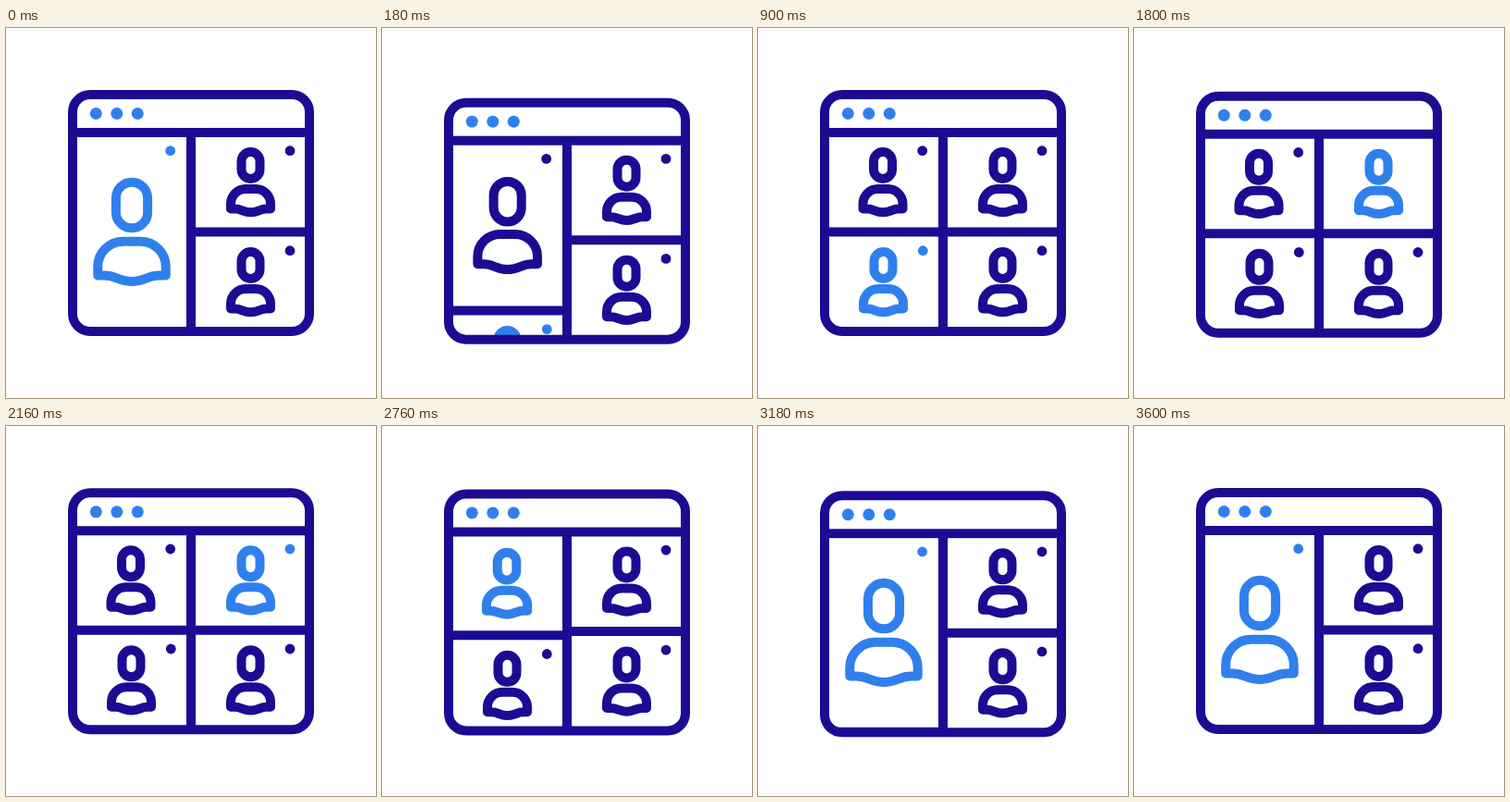
Animation of 400 by 400 pixels, one loop 4130 ms. Source, as an HTML page with a canvas:

```html
<!DOCTYPE html>
<html lang="en">
<head>
<meta charset="utf-8">
<title>Video call layout</title>
<style>
  html, body { margin: 0; width: 100%; height: 100%; overflow: hidden; background: #fff; }
  canvas { display: block; width: 400px; height: 400px; }
</style>
</head>
<body>
<canvas id="stage" width="400" height="400"></canvas>
<script>
const ctx = document.getElementById('stage').getContext('2d');
const LOOP = 4130, DARK = '#1b0c93', BLUE = '#2f80ed';
const SPLIT = 220.5, BOTTOM = 328;

const clamp = x => Math.min(1, Math.max(0, x));
const lerp = (a, b, k) => a + (b - a) * k;
const between = (t, a, b) => t >= a && t < b;
const cubicInOut = x => x < .5 ? 4 * x ** 3 : 1 - 4 * (1 - x) ** 3;

// cubic-bezier(x1, 0, x2, 1)
function bezier(x1, x2, x) {
  let lo = 0, hi = 1;
  for (let i = 0; i < 24; i++) {
    const s = (lo + hi) / 2, r = 1 - s;
    if (3 * x1 * s * r * r + 3 * x2 * s * s * r + s ** 3 < x) lo = s; else hi = s;
  }
  return lo * lo * (3 - 2 * lo);
}

const slide = t => bezier(.55, .14, clamp(t / 560));

function bob(t, peak, rise, fall) {
  if (t < rise) return peak * cubicInOut(clamp(t / rise));
  return peak * (1 - bezier(.2, .1, clamp((t - rise) / fall)));
}

function activeCell(t) {
  if (between(t, 30, 1620)) return 'BL';
  return between(t, 1620, 2700) ? 'TR' : 'TL';
}

const dotHidden = t => between(t, 1140, 1320) || between(t, 1620, 1830) ||
  between(t, 2310, 2520) || between(t, 2700, 2880);

function disc(x, y, r, color) {
  ctx.fillStyle = color;
  ctx.beginPath();
  ctx.arc(x, y, r, 0, 7);
  ctx.fill();
}

function line(x1, y1, x2, y2) {
  ctx.beginPath();
  ctx.moveTo(x1, y1);
  ctx.lineTo(x2, y2);
  ctx.stroke();
}

function windowPath() {
  ctx.beginPath();
  ctx.roundRect(72, 72, 256, 256, 19);
}

const shoulders = new Path2D('M-21.5 21.5V16A16 16 0 0 1-5.5 0H5.5A16 16 0 0 1 21.5 16V21.5' +
  'H17C10 21.5 8 25.3 0 25.3C-8 25.3-10 21.5-17 21.5Z');

// grow runs from 0 (small) to 1 (large); the stroke keeps its weight
function person(x, y, color, grow = 0) {
  const s = lerp(1, 1.71, grow);
  const headY = y + 43 * grow;
  const body = new Path2D();
  body.addPath(shoulders, new DOMMatrix([s, 0, 0, s, x + grow, headY + lerp(25.5, 39.3, grow)]));
  ctx.strokeStyle = color;
  ctx.stroke(body);
  ctx.beginPath();
  ctx.roundRect(x + grow - 10 * s, headY - 14.5 * s, 20 * s, 29 * s, 10 * s);
  ctx.stroke();
}

function draw(t) {
  const grow = t < 2670 ? 1 - slide(t) : slide(t - 2670);
  const drop = lerp(0, BOTTOM - SPLIT, grow);
  const shift = bob(t, 10.8, 285, 615) + bob(t - 1590, 2.3, 340, 440) + bob(t - 2670, 10.8, 285, 645);
  const active = activeCell(t);

  function cell(name, x, dotX, y, size) {
    const on = name === active, color = on ? BLUE : DARK;
    person(x, y + 148.5, color, size);
    if (!on || !dotHidden(t)) disc(dotX, y + 132.7, 5.4, color);
  }

  ctx.fillStyle = '#fff';
  ctx.fillRect(0, 0, 400, 400);
  ctx.save();
  ctx.translate(0, shift);
  ctx.lineWidth = 10;
  ctx.lineJoin = 'round';

  ctx.save();
  windowPath();
  ctx.clip();
  cell('TL', 135, 177.7, 0, grow);
  cell('TR', 264.5, 307, 0);
  cell('BL', 135.5, 178.3, 108 + drop);
  cell('BR', 264.5, 307, 108);
  ctx.strokeStyle = DARK;
  line(72, SPLIT + drop, 200, SPLIT + drop);
  ctx.restore();

  ctx.strokeStyle = DARK;
  line(72, 113, 328, 113);
  line(200, 113, 200, BOTTOM);
  line(200, SPLIT, 328, SPLIT);
  windowPath();
  ctx.stroke();
  for (const x of [97.3, 119.8, 142.3]) disc(x, 92.5, 6.5, BLUE);
  ctx.restore();
}

const start = performance.now();
function tick() {
  draw((performance.now() - start) % LOOP);
  requestAnimationFrame(tick);
}
tick();
</script>
</body>
</html>
```
